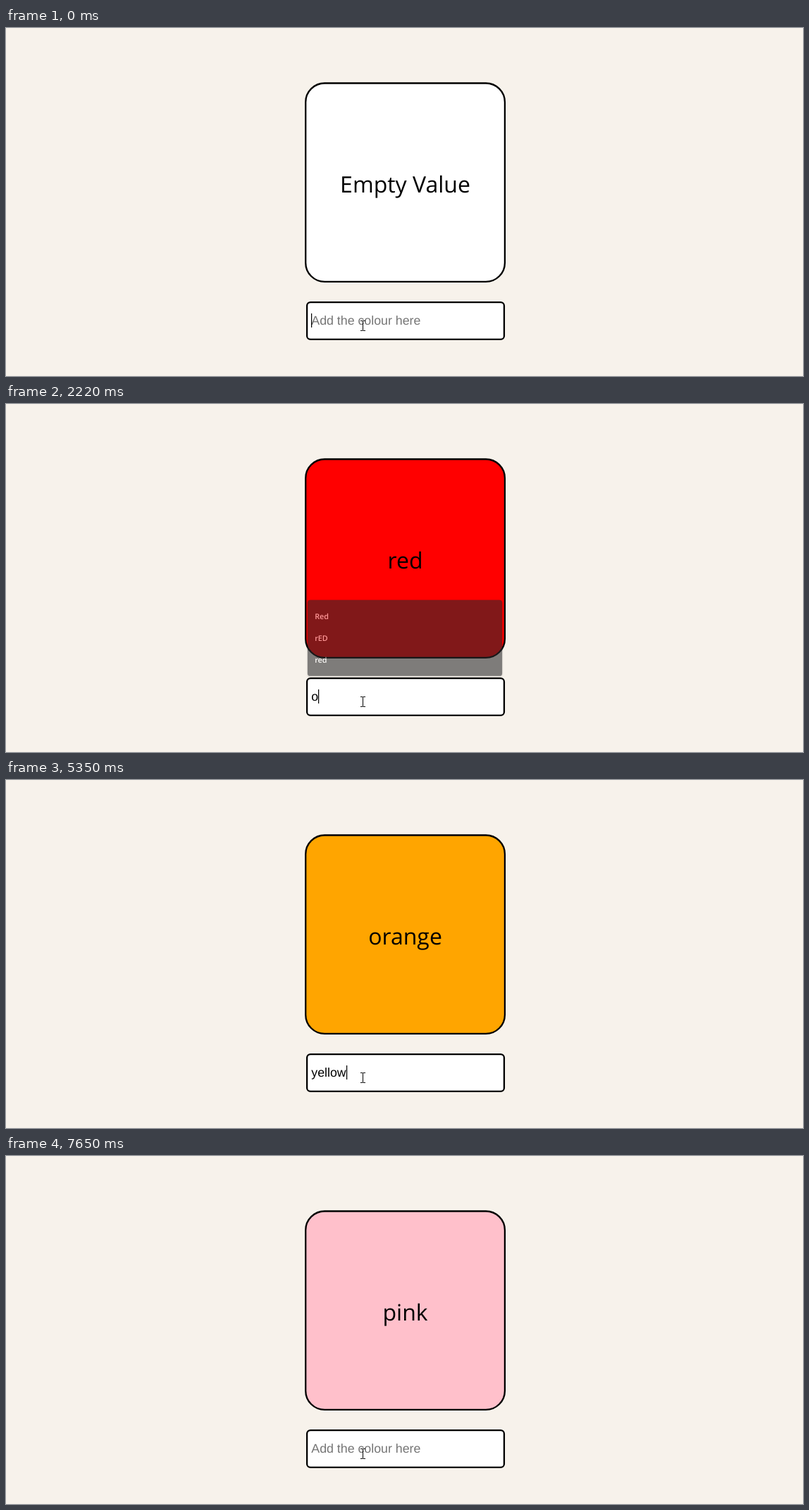
An HTML page for the animation above (7780 ms loop, 1131 by 495 pixels).

```html
<!DOCTYPE html>
<html lang="en">
<head>
<meta charset="utf-8">
<title>Colour box</title>
<style>
  html, body { margin: 0; width: 100%; height: 100%; overflow: hidden; background: #f7f2eb; }
  svg { display: block; width: 1131px; height: 495px; }
  text { text-rendering: geometricPrecision; }
  .frame { stroke: #000; stroke-width: 2.3; }
  #label { font: 32px "Open Sans", "Noto Sans", sans-serif; text-anchor: middle; }
  #value { font: 17.78px "Liberation Sans", Arial, sans-serif; }
  #popup { transform-origin: 566px 332.8px; filter: drop-shadow(0 1px 1px #0005); }
  #popup text { font: 600 11px "Open Sans", "Noto Sans", sans-serif; fill: #fff; }
</style>
</head>
<body>
<svg viewBox="0 0 1131 495">
  <rect id="card" class="frame" x="425.2" y="78.5" width="282.7" height="282.4" rx="27"/>
  <text id="label" x="566.5" y="234"></text>
  <g id="popup">
    <rect x="425" y="277.5" width="282" height="110.5" rx="4" fill="#2a2a2c"/>
    <text x="435.5" y="305">Red</text>
    <text x="435.5" y="337">rED</text>
    <text x="435.5" y="369">red</text>
  </g>
  <rect class="frame" x="427.1" y="390.1" width="279.8" height="52.8" rx="5" fill="#fff"/>
  <text id="value" x="433.3" y="422"></text>
  <rect id="caret" y="406" width="1.2" height="20"/>
  <path d="M503 416.5h3l.5.5.5-.5h3M506.5 417v13M503 430.5h3l.5-.5.5.5h3" fill="none" stroke="#000"/>
</svg>
<script>
const LOOP = 7780;
const PLACEHOLDER = 'Add the colour here';
const TEXT_LEFT = 433.3;
const [card, label, popup, value, caret] =
  ['card', 'label', 'popup', 'value', 'caret'].map(id => document.getElementById(id));

const type = text => ({ text, caret: true });
const submit = color => ({ color, text: '' });
const blink = caret => ({ caret });

const timeline = [
  [0, { color: '', text: '', caret: true, popup: 0 }],
  [550, type('r')], [620, { popup: 0.6 }], [690, { ...type('re'), popup: 1 }], [810, type('red')],
  [1340, blink(false)], [1410, submit('red')], [1870, blink(true)],
  [2150, { ...type('o'), popup: 0.88 }], [2220, { popup: 0.59 }], [2290, { popup: 0.2 }], [2360, { popup: 0 }],
  [2560, type('or')], [2690, type('ora')], [2960, type('oran')], [3190, type('orang')], [3390, type('orange')],
  [3870, blink(false)], [3940, submit('orange')],
  [4340, type('y')], [4540, type('ye')], [4880, type('yel')], [5010, type('yell')], [5140, type('yello')],
  [5280, type('yellow')], [5680, submit('yellow')], [5900, blink(false)], [6430, blink(true)],
  [6500, type('p')], [6700, type('pi')], [6900, type('pin')], [7100, type('pink')],
  [7450, submit('pink')], [7650, blink(false)]
];

function stateAt(time) {
  return Object.assign({}, ...timeline.filter(([start]) => start <= time).map(([, change]) => change));
}

function draw(state) {
  card.setAttribute('fill', state.color || '#fff');
  label.textContent = state.color || 'Empty Value';
  value.textContent = state.text || PLACEHOLDER;
  value.setAttribute('fill', state.text ? '#000' : '#757575');
  const textWidth = state.text ? value.getComputedTextLength() : 0;
  caret.setAttribute('x', Math.round(TEXT_LEFT + textWidth));
  caret.style.visibility = state.caret ? 'visible' : 'hidden';
  popup.style.opacity = state.popup;
  popup.style.transform = `scale(${0.95 + 0.05 * state.popup})`;
}

let begin;
function tick(now) {
  begin ??= now;
  draw(stateAt((now - begin) % LOOP));
  requestAnimationFrame(tick);
}
draw(stateAt(0));
requestAnimationFrame(tick);
</script>
</body>
</html>
```
